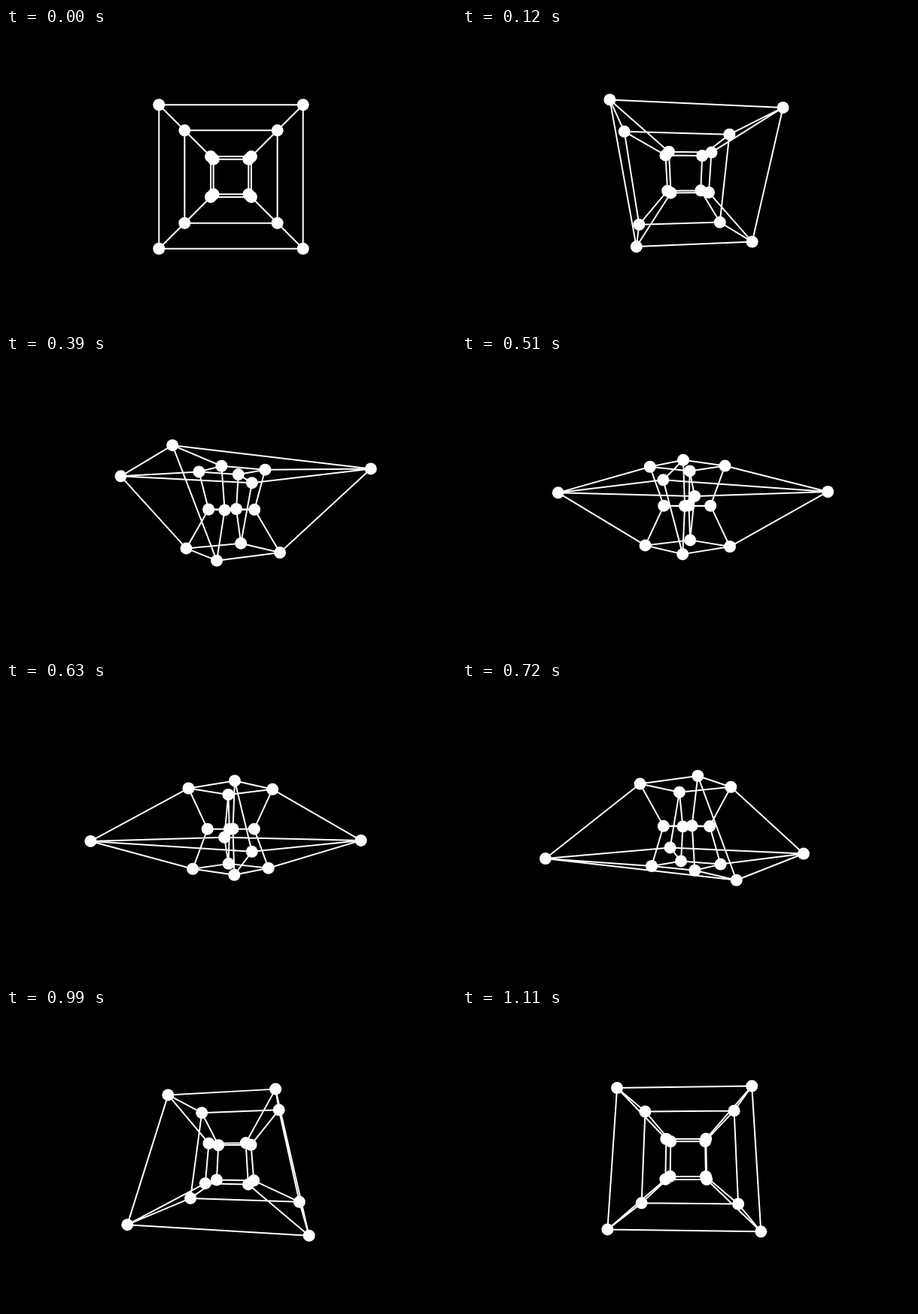
Animation, 598 px wide and 398 px high, one loop 1140 ms. Source, as an HTML page with a canvas:

```html
<!DOCTYPE html>
<html lang="en">
<head>
<meta charset="utf-8">
<title>Rotating tesseract</title>
<style>
  html, body { margin: 0; width: 100%; height: 100%; overflow: hidden; background: #000; }
  canvas { display: block; }
</style>
</head>
<body>
<canvas id="stage" width="598" height="398"></canvas>
<script>
const ctx = document.getElementById('stage').getContext('2d');
const STEPS = 38, STEP_MS = 30;
const TURN = 0.02, TURNS = 78;        // whole small turns, about a quarter circle per loop
const CX = 299, CY = 198;
const SCALE = 75;                     // size of the 3D shadow
const CAMERA = 200 * Math.sqrt(3);    // eye distance for a 60° view 400 high
const EYE_W = 2;                      // eye distance along the fourth axis

// Corner i has coordinates ±1 from its four bits.
const corners = Array.from({ length: 16 }, (_, i) =>
  [1, 2, 4, 8].map(bit => (i & bit ? 1 : -1)));

const turn = (a, b, angle) => {
  const c = Math.cos(angle), s = Math.sin(angle);
  return [a * c + b * s, b * c - a * s];
};

// Turn in the xz and yw planes, then project 4D to 3D to 2D.
function project([x0, y0, z0, w0], angle) {
  const [x, z] = turn(x0, z0, angle);
  const [y, w] = turn(y0, w0, angle);
  const k = SCALE / (EYE_W - w);
  const p = k / (1 - z * k / CAMERA);
  return [CX + x * p, CY + y * p];
}

function draw(step) {
  const angle = TURN * Math.round(step * TURNS / STEPS);
  const pts = corners.map(c => project(c, angle));
  ctx.fillStyle = '#000';
  ctx.fillRect(0, 0, 598, 398);
  ctx.fillStyle = ctx.strokeStyle = '#fff';
  ctx.lineWidth = 2;

  ctx.beginPath();
  for (let i = 0; i < 16; i++) {
    for (const bit of [1, 2, 4, 8]) {
      if (i & bit) continue;
      ctx.moveTo(...pts[i]);
      ctx.lineTo(...pts[i | bit]);
    }
  }
  ctx.stroke();

  for (const [x, y] of pts) {
    ctx.beginPath();
    ctx.arc(x, y, 8, 0, Math.PI * 2);
    ctx.fill();
  }
}

let start = null;
function tick(now) {
  if (start === null) start = now;
  draw(Math.floor(Math.max(0, now - start) / STEP_MS) % STEPS);
  requestAnimationFrame(tick);
}
draw(0);
requestAnimationFrame(tick);
</script>
</body>
</html>
```
